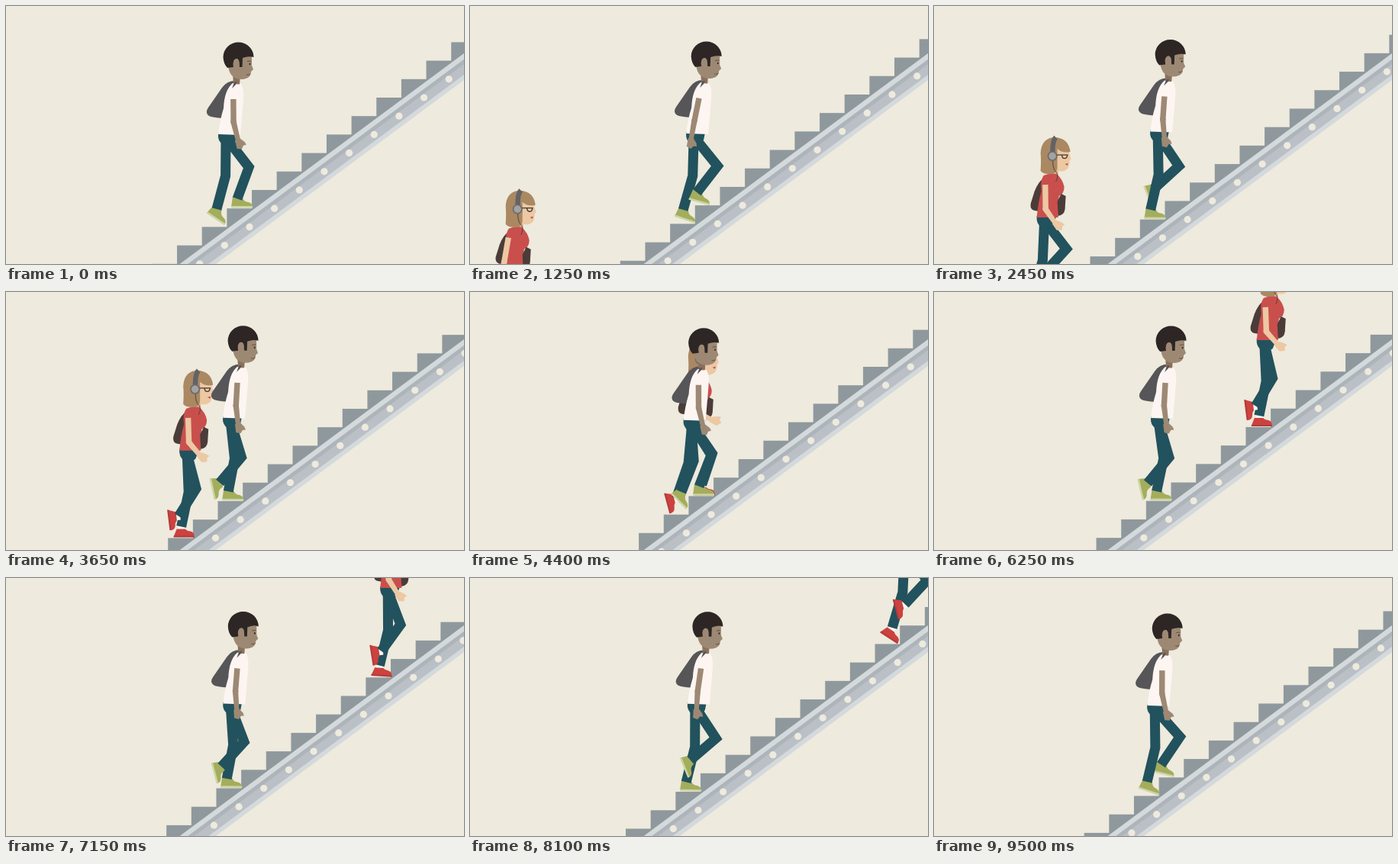
An HTML page with a canvas that plays this animation: 600x338 px, repeating every 9.55 s.

```html
<!DOCTYPE html>
<html>
<head>
<meta charset="utf-8">
<style>
  html, body { margin: 0; width: 100%; height: 100%; overflow: hidden; background: #eeeadd; }
  canvas { display: block; }
</style>
</head>
<body>
<canvas id="stage" width="600" height="338"></canvas>
<script>
const g = document.getElementById('stage').getContext('2d');
const LOOP = 9550, TICK = 50, STEP = LOOP / 22;  // one stair passes per STEP
const RUN = 32.65, RISE = 24.2;                  // stair size
const BG = '#eeeadd', DENIM = '#22525d', SKIN = '#9d8973', PALE = '#ecc8a3';
const rad = deg => deg * Math.PI / 180;

function shape(d, fill, stroke, width) {
  const path = new Path2D(d);
  if (fill) { g.fillStyle = fill; g.fill(path); }
  if (stroke) { g.strokeStyle = stroke; g.lineWidth = width; g.stroke(path); }
}

function oval(x, y, rx, ry, fill) {
  g.fillStyle = fill;
  g.beginPath();
  g.ellipse(x, y, rx, ry, 0, 0, 7);
  g.fill();
}

function at(x, y, angle, draw) {
  g.save();
  g.translate(x, y);
  g.rotate(rad(angle));
  draw();
  g.restore();
}

// Linear interpolation through rows of [time, ...values], repeating every 2.
function track(keys, t) {
  t = (t % 2 + 2) % 2;
  const i = keys.findIndex(k => k[0] >= t) || 1;
  const a = keys[i - 1], b = keys[i], f = (t - a[0]) / (b[0] - a[0]);
  return a.slice(1).map((v, n) => v + (b[n + 1] - v) * f);
}

// Gait rows: [phase, ankle x, ankle y, foot angle]; phase 0 is touchdown.
const MAN_GAIT = [
  [0, 303, 252.5, 0], [.65, 282, 268.3, 1], [.85, 279, 267, 20], [1, 276, 266, 34],
  [1.36, 280, 250, 78], [1.65, 290, 237, 66], [1.85, 298, 245, 11], [1.94, 300, 249, 4], [2, 303, 252.5, 0]
];
const WOMAN_GAIT = [
  [0, 253, 290, 0], [.4, 227, 309.4, 0], [.645, 217, 314, 38], [.94, 207, 322, 70],
  [1.36, 226, 294, 83], [1.645, 236, 281, 74], [1.85, 246, 280, 30], [1.94, 251.5, 286, 4], [2, 253, 290, 0]
];
const MAN_SWAY = [[0, 0], [.33, 6], [.65, 7], [.85, 5], [1, 4], [1.33, 6], [1.65, 5], [1.85, 1], [2, 0]];

function greenShoe() {
  shape('M-6-3L6-3Q8 3 12 4Q20 5 20 11H-8Z', '#a3ad5c');
  shape('M-8 9.500H20V12H-8Z', '#cdd5a6');
}

function redShoe() {
  shape('M-4-2H5V6H-4Z', '#fbf6f2');
  shape('M-6 3H5Q8 6 12 6Q17 7 17 13H-10Z', '#cb423f');
  shape('M-10 12H17V14H-10Z', '#b33a3a');
}

function leg(hx, hy, [ax, ay, angle], thigh, shin, shoe) {
  at(ax, ay, angle, shoe);
  const dx = ax - hx, dy = ay - hy, d = Math.hypot(dx, dy);
  const along = (d * d + thigh * thigh - shin * shin) / (2 * d);
  const out = Math.sqrt(Math.max(36, thigh * thigh - along * along));  // knees never lock
  const kx = hx + (dx * along + dy * out) / d, ky = hy + (dy * along - dx * out) / d;
  shape(`M${hx} ${hy}L${kx} ${ky}L${ax} ${ay}`, null, DENIM, 13);
}

function arm(x, y, upper, fore, upperLength, skin, hand) {
  at(x, y, -upper, () => {
    shape(`M-3.7 14L3.7 14L3.7 ${upperLength}L-3.7 ${upperLength}Z`, skin);
    at(0, upperLength - 1, upper - fore, () => {
      oval(0, 0, 3.7, 3.7, skin);
      shape('M-3.7 0H3.7L3 28H-3Z', skin);
      shape(hand, skin);
    });
  });
}

function man(p) {
  const [dx] = track(MAN_SWAY, p), dy = -1.9 + 1.9 * Math.cos(2 * Math.PI * p);
  const swing = Math.cos(Math.PI * p);
  for (const side of [0, 1])
    leg(288 + dx, 172 + dy, track(MAN_GAIT, p + side), 49.5, 44, greenShoe);
  at(dx, dy, 0, () => {
    shape('M278 166L303 166L301 176Q296 186 288 183Q279 180 278 172Z', DENIM);
    shape('M302 98Q290 97 283 107L265 133Q260 140 266 144Q270 146 284 147L296 120Z', '#565558');
    shape('M297 88L307 90L306 103L298 102Z', '#8b705b');
    shape('M297 101Q303 104 308 102Q312 108 311 122L307 169L278 168Q280 150 285 134Q286 110 297 101Z', '#fdf5f2');
    shape('M299 100L303 99L301 103L296 108Z', '#565558');
    // head
    shape('M291 72Q290 96 309 96Q321 95 321 86L324 83L322 78V66H295Z', SKIN);
    shape('M324.500 67A20 19.500 0 0 0 284.500 67Q285 76 290 81L298 80Q296 70 302 69Q306 70 306 80H309.500L310 68Q318 65 324.500 67Z', '#2d2625');
    oval(302, 74, 3.6, 5, SKIN);
    oval(319.5, 76, .9, 1.3, '#2d2625');
    shape('M316 72.500L321 72M315 90Q318 91 320 89', null, '#5d493d', .9);
    arm(297.7, 108, -6 + 6.5 * swing, 1 + 13 * swing, 45, SKIN,
      'M-4 24L3 23L8 29L9 33L5 33L2 37L-4 35Z');
  });
}

function woman(p) {
  const bob = 2.5 - 2.5 * Math.cos(2 * Math.PI * (p - .36)), swing = Math.cos(Math.PI * p);
  at((p - 8.357) * RUN, (8.357 - p) * RISE, 0, () => {
    for (const side of [0, 1])
      leg(237 - bob, 212 + bob, track(WOMAN_GAIT, p + side), 47, 43, redShoe);
    at(-bob, bob, 0, () => {
      shape('M227 206H253L248 219Q241 225 233 221Q226 216 227 206Z', DENIM);
      shape('M236 157Q229 161 224 174L219 190Q218 198 224 199L237 201L244 165Z', '#4b3c39');
      shape('M245 140H255V154H245Z', '#e3b78f');
      shape('M236 153Q244 149 253 151Q261 158 263 168Q263 177 256 180L255 208H227Q229 187 233 174Q231 160 236 153Z', '#c94f4d');
      shape('M259 177L265 180L264 197Q263 205 255 206L254 187Z', '#4b3c39');
      // head
      shape('M249 115H269L270 126L272 131L270 134Q270 145 263 147Q254 149 249 143Z', PALE);
      shape('M232 147Q233 132 232 124Q233 103 252 103Q269 105 271 122Q260 124 254 118L254 140Q255 152 242 151Q235 151 232 147Z', '#aa8862');
      shape('M250 126L268 126M260 126Q260 131 264 130.500Q267 130 267 126', null, '#40393a', 1.4);
      shape('M264 138L268 137L267 140Z', '#c04445');
      shape('M252 103Q247 108 248 127', null, '#636366', 6.5);
      oval(247.5, 127.5, 6.5, 6.5, '#6b6b6e');
      oval(247.5, 127.5, 4.8, 4.8, '#a2a2a3');
      shape('M248 134Q248 145 253 149Q256 154 252 161', null, '#4b3c39', .9);
      arm(238, 151, -2 + 9 * swing, 22 + 43 * swing, 47, PALE,
        'M-4 21L4 21L7 26L9 31L5 31L2 35L-4 31Z');
    });
  });
}

function escalator(p) {
  const shift = p % 1;
  for (let i = -5; i < 11; i++) {
    g.fillStyle = '#8f999d';
    g.fillRect(322 + (i - shift) * RUN, 241 - (i - shift) * RISE, RUN + .6, 36);
  }
  const slope = RISE / RUN;
  const band = (from, to, fill) =>
    shape(`M200 ${62 + 400 * slope + from}L600 ${62 + from}V${62 + to}L200 ${62 + 400 * slope + to}Z`, fill);
  band(0, 35, '#d4d9dc');
  band(8, 28, '#bac0c5');
  band(8, 14, '#adb4ba');
  for (let i = -5; i < 11; i++)
    oval(319 + (i - shift) * RUN, 289.4 - (i - shift) * RISE, 4.6, 4.6, BG);
}

function frame(now) {
  const t = Math.floor(now % LOOP / TICK) * TICK;
  const p = Math.max(0, t - 20) / STEP;
  g.fillStyle = BG;
  g.fillRect(0, 0, 600, 338);
  escalator(p);
  woman(p);
  man(p);
}

const start = performance.now();
requestAnimationFrame(function play() {
  frame(performance.now() - start);
  requestAnimationFrame(play);
});
</script>
</body>
</html>
```
